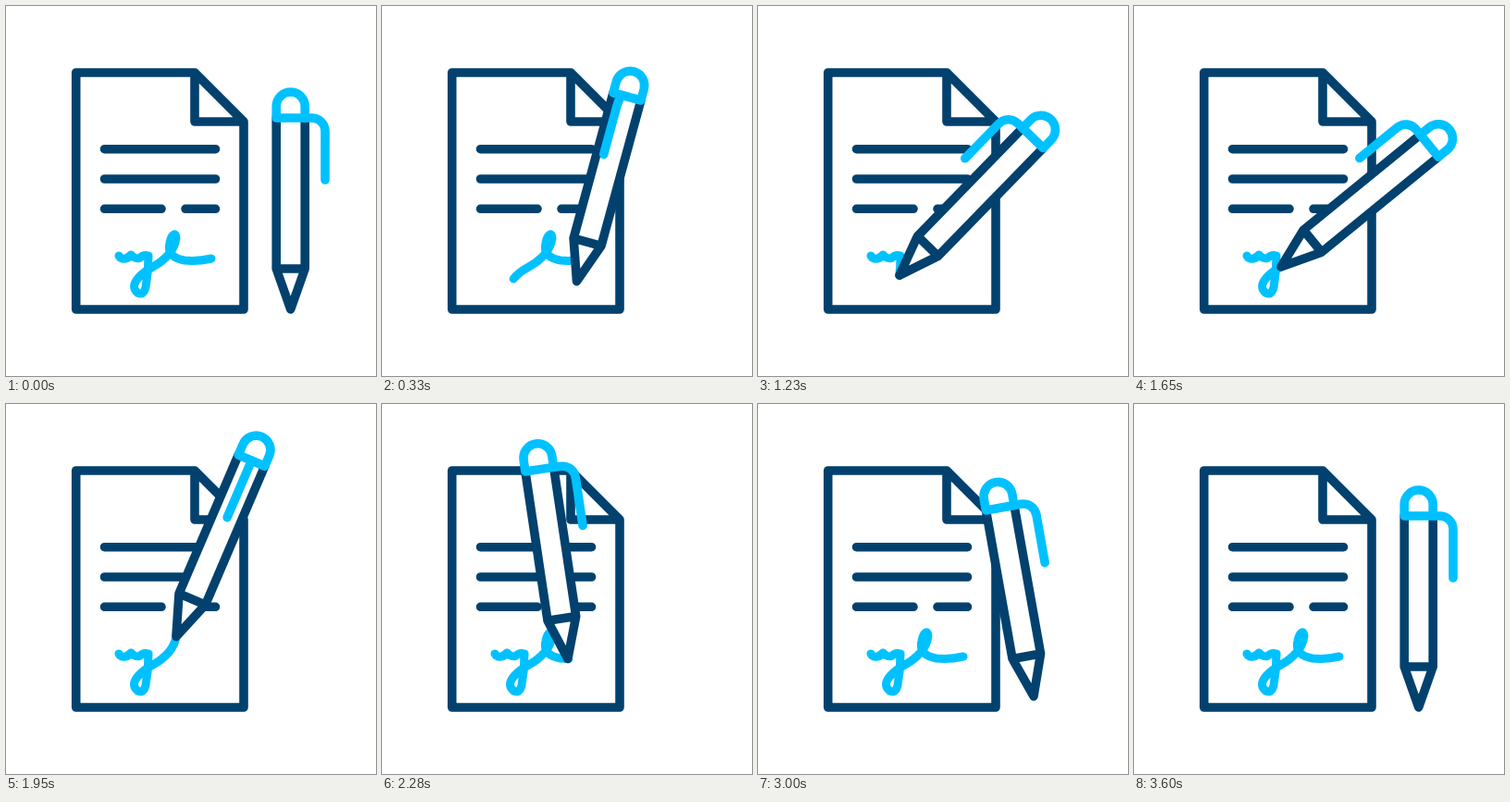
An HTML page for the animation above (3630 ms loop, 400x400 px).

```html
<!DOCTYPE html>
<html lang="en">
<head>
<meta charset="utf-8">
<title>Pen and document</title>
<style>
  html, body { margin: 0; width: 100%; height: 100%; overflow: hidden; background: #fff; }
  svg { display: block; width: 100vw; height: 100vh; }
  path { fill: none; stroke-width: 9.6; stroke-linecap: round; stroke-linejoin: round; }
  .navy { stroke: #02416e; }
  .cyan { stroke: #00c1ff; }
  .solid { fill: #fff; }
  .ink { stroke-width: 9; }
</style>
</head>
<body>
<svg viewBox="0 0 400 400">
  <path class="navy" d="M204 72H75.7V328H257V125ZV125H257"/>
  <path class="navy" d="M106.5 154.7H226.5M106.5 187H226.5M106.5 219.3H168M194 219.3H226.5"/>
  <path class="cyan ink" id="old"/>
  <path class="cyan ink" id="fresh"/>
  <g id="pen">
    <path class="navy solid" d="M-15.5 -207V-44L0 0L15.5 -44V-207M-15.5 -44H15.5"/>
    <path class="cyan solid" d="M-15.5 -207V-219.5A15.5 15.5 0 0 1 15.5 -219.5V-207Z"/>
    <path class="cyan" id="clip"/>
  </g>
</svg>
<script>
const LOOP = 3630, STEP = 30;
const WRITE_START = 640, WRITE_END = 2440, ERASE_END = 780;
const $ = id => document.getElementById(id);
const old = $('old'), fresh = $('fresh'), pen = $('pen'), clip = $('clip');

// Pen stroke, one cubic per entry
const curves = [
  '124 274 130 275 135 269', '138 272 142 274 145 272', '148 269 151 269 154 270',
  '154 282 153 293 151 304', '149 313 143 313 139 306', '136 298 148 288 157 283',
  '170 276 182 265 184 251', '184 244 179 246 177 256', '174 268 182 273 193 275',
  '203 276 213 275 222 273'
];
const strokeTo = n => 'M122 270' + curves.slice(0, n).map(c => 'C' + c).join('');

const ends = [0];
for (let n = 1; n <= curves.length; n++) {
  old.setAttribute('d', strokeTo(n));
  ends.push(old.getTotalLength());
}
fresh.setAttribute('d', strokeTo(curves.length));
const total = ends[curves.length];

// Rows of [time, value]
const written = [[640, 0], [750, 1], [1230, 3.62], [1650, 6.05], [1740, 6.45],
  [2010, 7.2], [2160, 8.4], [2280, 9.27], [2440, 10]];
const angle = [[0, 0], [640, 34], [750, 36.4], [1230, 44.2], [1650, 50.8], [1740, 52],
  [2010, 14], [2160, -2], [2280, -8.5], [2440, -9], [2700, -8], [3000, -10.1],
  [3300, 1.5], [3600, 0]];
const tipX = [[0, 307.7], [640, 122], [2440, 222], [2700, 276], [3000, 298], [3290, 311], [3600, 307.7]];
const tipY = [[0, 328], [640, 270], [2440, 273], [2700, 258], [3000, 316], [3290, 336], [3600, 328]];
const side = [[0, 1], [90, 1], [510, -1], [1740, -1], [2160, 1]];

// Monotone cubic interpolation, so no curve overshoots its keys
function at(keys, t) {
  const last = keys.length - 1;
  if (t <= keys[0][0]) return keys[0][1];
  if (t >= keys[last][0]) return keys[last][1];
  let i = 0;
  while (t >= keys[i + 1][0]) i++;
  const slope = k => (keys[k + 1][1] - keys[k][1]) / (keys[k + 1][0] - keys[k][0]);
  const tangent = k => {
    if (k === 0 || k === last) return 0;
    const a = slope(k - 1), b = slope(k);
    return a * b <= 0 ? 0 : 2 * a * b / (a + b);
  };
  const h = keys[i + 1][0] - keys[i][0], u = (t - keys[i][0]) / h, v = 1 - u;
  return keys[i][1] * (1 + 2 * u) * v * v + tangent(i) * h * u * v * v
    + keys[i + 1][1] * u * u * (3 - 2 * u) - tangent(i + 1) * h * u * u * v;
}

function show(path, from, to) {
  path.style.display = to > from ? '' : 'none';
  path.style.strokeDasharray = `${to - from} ${total * 2}`;
  path.style.strokeDashoffset = -from;
}

function draw(t) {
  const p = at(written, t), n = Math.min(Math.floor(p), curves.length - 1);
  const done = ends[n] + (ends[n + 1] - ends[n]) * (p - n);
  show(old, total * Math.min(t / ERASE_END, 1), total);
  show(fresh, 0, done);

  const writing = t >= WRITE_START && t <= WRITE_END;
  const tip = writing ? fresh.getPointAtLength(done) : { x: at(tipX, t), y: at(tipY, t) };
  pen.setAttribute('transform', `translate(${tip.x} ${tip.y}) rotate(${at(angle, t)})`);

  const s = at(side, t);
  clip.setAttribute('d',
    `M${15.5 * s} -207H${22 * s}C${31 * s} -207 ${37.3 * s} -201 ${37.3 * s} -192V-140`);
}

function tick(now) {
  draw(Math.floor(now % LOOP / STEP) * STEP);
  requestAnimationFrame(tick);
}
draw(0);
requestAnimationFrame(tick);
</script>
</body>
</html>
```
